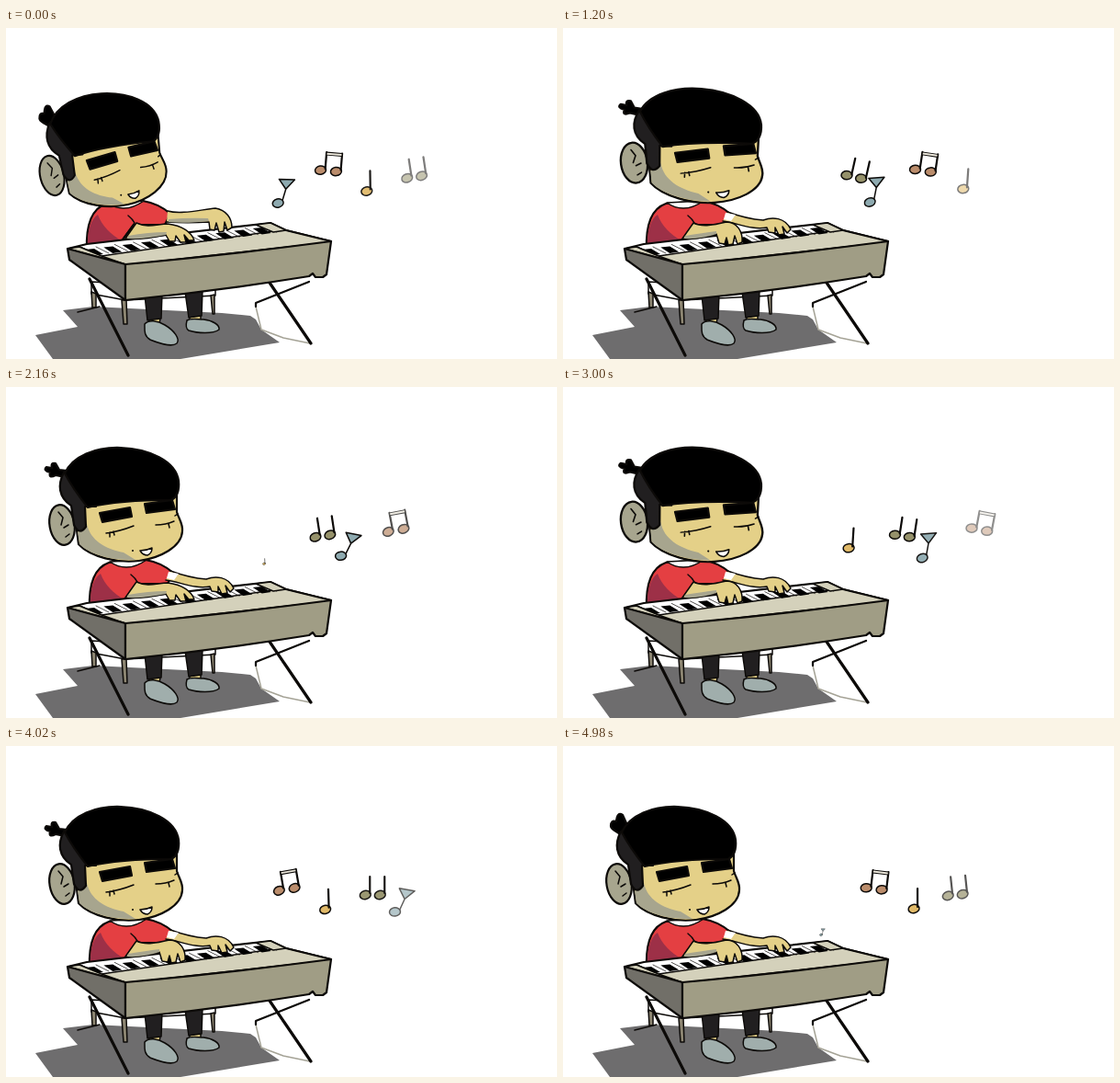
Write an HTML page that moves like this. It is 600 by 360 pixels and loops after 5040 ms.

```html
<!DOCTYPE html>
<html lang="en">
<head>
<meta charset="utf-8">
<title>Keyboard player</title>
<style>
html, body { margin: 0; width: 100%; height: 100%; overflow: hidden; background: #fff; }
svg { display: block; width: 600px; height: 360px; }
.ink { fill: none; stroke: #0c0a08; stroke-width: 2.2; stroke-linecap: round; stroke-linejoin: round; }
.thin { stroke-width: 1.5; }
.thick { stroke-width: 3.2; }
.flat { stroke: none; }
.skin { fill: #e4d088; }
.shade { fill: #a7a58e; }
.red { fill: #e43f42; }
.maroon { fill: #9d3047; }
.dark { fill: #211f20; }
.black { fill: #000; }
.white { fill: #fff; }
.shoe { fill: #a0aeac; }
.wood { fill: #8d8672; }
.top { fill: #d4d1bb; }
.side { fill: #716f68; }
.front { fill: #a09d85; }
.hide { display: none; }
</style>
</head>
<body>
<svg viewBox="0 0 600 360">
  <path fill="#6e6d6e" d="M62 307L95 303L235 310L266 313L272 317L278 328L298 342L190 360H51L32 334L78 325Z"/>

  <!-- stool, stand and legs -->
  <g class="ink thin">
    <path class="white" d="M93 276V289L130 296L228 291V284Z"/>
    <path class="wood" d="M93 287L94 304H98V289ZM126 296L128 322H132L131 296ZM223 291L225 311H227V290Z"/>
    <path d="M78 309L102 303"/>
    <path stroke="#b5b3a0" style="stroke:#a5a396" d="M272 303L278 328L302 337L331 343"/>
  </g>
  <path class="ink" d="M330 276L272 299V303"/>
  <path class="ink thick" d="M91 273L133 356M287 277L332 343"/>
  <g class="ink thin">
    <path class="skin" d="M156 314H168L167 324H156ZM200 312H212V320H200Z"/>
    <path class="dark" d="M151 290L170 288L169 316L154 318ZM195 287L214 285L213 313L199 315Z"/>
    <path class="shoe" d="M151 322C155 317 165 318 173 323C183 329 190 338 186 343C180 348 165 342 157 339C150 335 151 329 151 322Z"/>
    <path class="shoe" d="M197 318C202 315 209 317 215 317C225 318 233 323 232 328C226 333 208 332 199 329C195 327 196 322 197 318Z"/>
  </g>

  <g id="torso" class="ink">
    <path class="red" d="M91 241C90 216 95 197 112 191L152 188C164 190 174 195 182 202L176 214H142L129 232L121 241Z"/>
    <path class="maroon flat" d="M92 240C91 220 96 207 103 203C108 216 117 224 128 231L120 240Z"/>
    <path class="thin" d="M136 204Q141 208 143 212L129 231"/>
    <path class="white thin" d="M113 190Q132 203 153 188Z"/>
  </g>

  <!-- keyboard -->
  <g class="ink">
    <path class="white" d="M67 240L88 235L288 212L305 220L354 232L130 257Z"/>
    <path class="top flat" d="M104 248L301 220L354 232L130 257Z"/>
    <path class="thin" d="M80 238L104 248L298 220"/>
    <g id="keys"></g>
    <path class="top thin" d="M272 214L288 212L305 220L291 222ZM67 240L80 238L104 248L130 257Z"/>
    <path class="side" d="M67 240L130 257V296L69 252Z"/>
    <path class="front" d="M130 257Q240 247 354 232L349 268L345 271H337L334 267L330 270Q230 286 130 296Z"/>
    <path d="M354 232L305 220"/>
  </g>

  <!-- arms -->
  <g class="ink thin">
    <g id="rightHigh">
      <path class="skin" d="M176 199C190 203 210 198 228 196C240 198 246 207 246 217L241 220L238 211L237 221L232 222L229 212L227 220L222 219L221 211C205 212 190 212 175 211"/>
      <path class="shade flat" d="M177 208Q200 206 220 207L221 210Q195 213 177 211Z"/>
    </g>
    <g id="rightLow">
      <path class="skin" d="M179 200C190 204 205 208 218 209C228 205 242 206 248 219L244 223L239 216L241 224L235 225L231 217V223L224 222L222 217C205 220 190 212 174 210"/>
      <path class="white flat" d="M177 201L188 203L183 210L175 208Z"/>
    </g>
    <g id="leftWide">
      <path class="skin" d="M142 212C155 218 165 213 176 213C192 215 202 222 205 231L199 231L194 225L196 233L190 233L185 226L184 232L178 232L174 225C160 228 145 231 130 229Z"/>
      <path class="shade flat" d="M133 226Q155 222 175 222L174 225Q150 230 132 229Z"/>
    </g>
    <g id="leftTight">
      <path class="skin" d="M142 212C152 217 165 214 178 211C190 211 196 222 195 233L190 235L187 226L185 235L180 236L178 228L176 235L170 234L167 224C155 227 142 231 130 229Z"/>
      <path class="shade flat" d="M133 226Q152 223 167 221V224Q150 230 132 229Z"/>
    </g>
  </g>

  <g id="head" class="ink">
    <path id="flare" class="black" d="M64 98L54 96Q46 100 48 93Q40 91 44 87L50 88Q48 82 54 83L58 90L67 91Z"/>
    <path id="lift" class="black" d="M62 96C56 91 52 91 52 87Q52 80 58 82Q59 71 65 75L70 86Z"/>
    <path class="skin" d="M75 140L79 171C92 185 122 192 145 189C168 186 191 174 192 157C193 149 188 143 186 136V112L90 118Z"/>
    <path class="shade flat" d="M78 158L88 149C92 167 108 176 128 180L141 188C118 189 92 183 80 171Z"/>
    <ellipse class="shade" cx="61" cy="150" rx="13.500" ry="22" transform="rotate(-10 61 150)"/>
    <path class="thin" d="M57 136L62 142L60 150M63 153L68 150M65 163L69 160"/>
    <path class="dark" d="M63 93C56 106 57 120 71 129L74 150Q80 162 87 152L86 130H98L72 88Z"/>
    <path class="black" d="M64 94C72 75 98 65 125 66C155 67 185 80 188 102C189 112 187 119 180 123C150 123 115 125 89 131Q73 111 64 94Z"/>
    <path class="black" d="M102 137L135 131L137 141L105 147ZM151 127L181 123L184 133L153 137Z"/>
    <path class="thin" d="M109 159Q124 157 139 151M113 158V163M117 157L118 161M163 150Q174 150 183 146M177 149L178 153M184 140L187 138"/>
    <path class="white thin" d="M146 178Q153 178 159 175Q159 181 154 183Q149 183 146 178Z"/>
    <circle class="black flat" cx="138" cy="178" r="1"/>
  </g>

  <g id="notes"></g>
</svg>
<script>
const FRAME = 60, COUNT = 84, BEAT = 28, START_X = 281;
const $ = id => document.getElementById(id);
const clamp = v => Math.max(0, Math.min(1, v));
const show = (el, on) => el.classList.toggle('hide', !on);

// Black keys and the gaps between white ones, along the back edge
let keys = '';
for (let i = 0; i < 10; i++) {
  const x = 86 + i * 20.3, y = 241 - i * 2.55;
  keys += `<path class="black flat" d="M${x} ${y}l10 -1l10 6l-10 1.500z"/>
    <path stroke-width=".7" style="stroke-width:.7" d="M${x + 12} ${y - 3}l14 7"/>`;
}
$('keys').innerHTML = keys;

// One head, moved and tilted about its middle
const pivot = (dx, dy, stretch, turn) =>
  `translate(${125 + dx} ${130 + dy}) scale(${stretch} 1) rotate(${turn}) translate(-125 -130)`;
const poses = {
  left: pivot(-16, 5, 0.95, -5),
  middle: '',
  right: pivot(22, 0, 1.07, 3)
};

const bulb = (x, fill) =>
  `<ellipse class="ink thin" cx="${x}" rx="6" ry="4.600" transform="rotate(-12 ${x} 0)" style="fill:${fill}"/>`;
const stem = (x, h) => `<path class="ink" d="M${x + 5} -2V${-h}"/>`;
const double = (gap, fill) => bulb(0, fill) + bulb(gap, fill) + stem(0, 20) + stem(gap, 20);

const kinds = {
  flag: {
    lane: 191, drift: -0.12, speed: 1.9, phase: 8, swing: 8, end: 447,
    art: bulb(0, '#8eaab0') + '<path class="ink thin" style="fill:#8eaab0" d="M5 -3L9 -15L2 -26L19 -25L9 -15"/>'
  },
  beam: {
    lane: 155.5, drift: 0, speed: 2.05, phase: 23, swing: 11, end: 460,
    art: double(17, '#bb8d6c') + '<path class="ink" style="fill:#ece8dc;stroke-width:1" d="M5 -20H22V-17H5Z"/>'
  },
  single: {
    lane: 177, drift: 0, speed: 2.15, phase: 20, swing: 4, end: 455,
    art: bulb(0, '#e0b968') + stem(-1, 22)
  },
  pair: {
    lane: 162, drift: 0, speed: 1.75, phase: 18, swing: 14, end: 441,
    art: double(16, '#95916a')
  }
};

// Step at which each note leaves the keyboard; negative ones are already under way
const notes = [
  ['pair', -89], ['single', -52], ['beam', -30], ['flag', -8],
  ['pair', 4], ['single', 36], ['beam', 59], ['flag', 83]
].map(([name, born]) => {
  const el = document.createElementNS('http://www.w3.org/2000/svg', 'g');
  el.innerHTML = kinds[name].art;
  $('notes').append(el);
  return { kind: kinds[name], born, el };
});

function drawNote({ kind, born, el }, f) {
  const age = f - born, x = START_X + kind.speed * age;
  const on = age >= 0 && x < kind.end;
  show(el, on);
  if (!on) return;
  const sway = Math.cos((f - kind.phase) / BEAT * 2 * Math.PI);
  const size = clamp((age + 2) / 8);
  const y = kind.lane + kind.drift * age - 2 * sway + 18 * (1 - size);
  el.setAttribute('transform', `translate(${x} ${y}) rotate(${kind.swing * sway}) scale(${size})`);
  el.setAttribute('opacity', clamp(1 - (x - 385) / 110));
}

function draw(f) {
  const p = f % BEAT, half = p % (BEAT / 2);
  const pose = p < 8 ? 'left' : p >= 13 && p < 23 ? 'right' : 'middle';
  $('head').setAttribute('transform', poses[pose]);
  $('torso').setAttribute('transform', `translate(${pose === 'left' ? -3 : 0} 0)`);

  const flared = p >= 8 && p < 23;
  show($('flare'), flared);
  show($('lift'), !flared);

  const high = half < 5, wide = high || p < 9;
  show($('rightHigh'), high);
  show($('rightLow'), !high);
  show($('leftWide'), wide);
  show($('leftTight'), !wide);

  for (const note of notes) drawNote(note, f);
}

const start = performance.now();
function tick() {
  draw(Math.floor(Math.max(0, performance.now() - start) / FRAME) % COUNT);
  requestAnimationFrame(tick);
}
draw(0);
requestAnimationFrame(tick);
</script>
</body>
</html>
```
